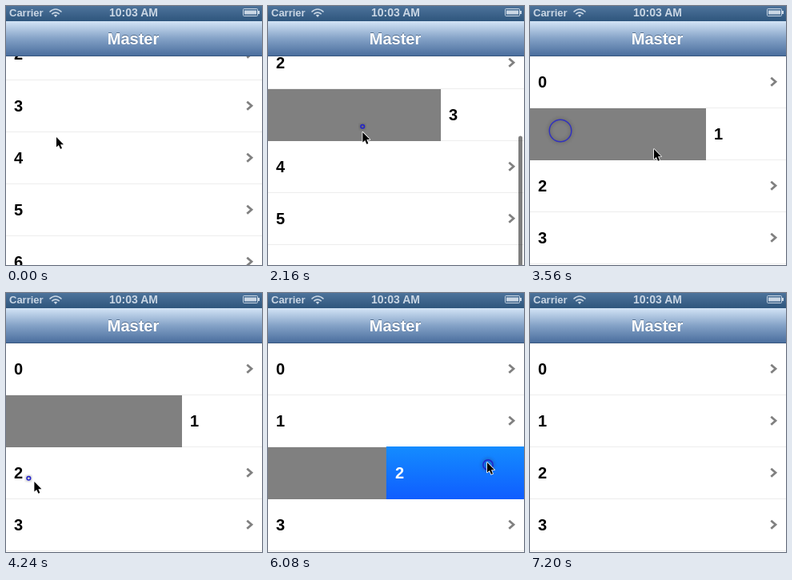
An HTML page for the animation above (7.56 s loop, 320 by 324 pixels).

```html
<!DOCTYPE html>
<html lang="en">
<head>
<meta charset="utf-8">
<title>Master list</title>
<style>
  html, body { margin: 0; width: 100%; height: 100%; overflow: hidden; background: #fff; }
  svg { display: block; width: 100%; height: 100%; }
  text { font: bold 20px "Liberation Sans", Arial, sans-serif; }
  .status { fill: #c9d6e4; }
</style>
</head>
<body>
<svg id="stage" viewBox="0 0 320 324">
  <defs>
    <linearGradient id="statusFill" x2="0" y2="1">
      <stop stop-color="#4d739b"/><stop offset="1" stop-color="#2d547b"/>
    </linearGradient>
    <linearGradient id="navFill" x2="0" y2="1">
      <stop stop-color="#d3e4f6"/><stop offset=".5" stop-color="#83a1c6"/>
      <stop offset="1" stop-color="#486c9c"/>
    </linearGradient>
    <linearGradient id="selectedFill" x2="0" y2="1">
      <stop stop-color="#148cff"/><stop offset="1" stop-color="#0f5dff"/>
    </linearGradient>
    <filter id="soft" x="-50%" y="-50%" width="200%" height="200%"><feGaussianBlur stdDeviation="2"/></filter>
  </defs>
  <rect width="320" height="324" fill="#fff"/>
  <g id="list"></g>
  <rect id="scrollBar" x="313" width="5" height="267" rx="2.5"/>
  <rect width="320" height="20" fill="url(#statusFill)"/>
  <rect y="19" width="320" height="44" fill="url(#navFill)"/>
  <rect y="62" width="320" height="1" fill="#38577f"/>
  <text class="status" x="4" y="13" style="font-size:13px">Carrier</text>
  <text class="status" x="159.5" y="13" text-anchor="middle" style="font-size:14px">10:03 AM</text>
  <g fill="none" stroke="#c9d6e4" stroke-width="1.6">
    <path d="M54.5 7.5Q62 .5 69.5 7.5M57.3 10.2Q62 6 66.7 10.2"/>
    <path d="M59.7 11.6Q62 9.8 64.3 11.6L62 14Z" fill="#c9d6e4" stroke="none"/>
    <rect x="296.5" y="3.5" width="18" height="9" rx="1" stroke-width="1"/>
    <path d="M298 8H313" stroke-width="5"/>
    <path d="M316 6V10" stroke-width="2"/>
  </g>
  <text x="159" y="47" text-anchor="middle" fill="#3f5878" opacity=".75">Master</text>
  <text x="159" y="48" text-anchor="middle" fill="#fff">Master</text>
  <g id="touch" fill="none">
    <circle id="glow" stroke="#333" stroke-width="4" opacity=".3" filter="url(#soft)"/>
    <circle id="ring" stroke="#2222cc" stroke-width="1.5"/>
  </g>
  <path id="cursor" d="M0 0V12.5L2.9 10L5 14.8L7 14L5 9.2H9Z" stroke="#fff" stroke-width="1.6" stroke-linejoin="round" paint-order="stroke"/>
</svg>
<script>
const LOOP = 7560, STEP = 40, ROW = 65, TOP = 63;
const OPEN = 220, SLIDE = 200, RECOGNISE = 80, RIPPLE = 520, LAG = 30;
const START_SCROLL = 165, GLIDE_TIME = 180;
const $ = id => document.getElementById(id);

const stop = (start, x, y) => ({ start, end: start, from: [x, y], to: [x, y] });

// A swipe is recognised after 18px, where its touch ends and ripples.
const swipe = (start, end, from, to) => ({
  start, end, from, to,
  release: start + RECOGNISE,
  origin: [from[0] + 18 * Math.sign(to[0] - from[0]), from[1]]
});

const openThree = swipe(810, 1200, [20, 123], [116, 131]);
const drag = { start: 2085, end: 2525, from: [118, 140], to: [120, 245], release: 2525, origin: [120, 245] };
const openOne = swipe(3250, 3560, [20, 156], [155, 179]);
const openTwo = swipe(4170, 4640, [19, 226], [129, 293]);
const closeTwo = swipe(5923, 6080, [293, 215], [274, 212]);
const gestures = [openThree, drag, openOne, openTwo, closeTwo];

// The cursor glides between gestures and waits off stage at times.
const moves = [
  stop(0, 63, 164), openThree, drag, openOne, openTwo,
  stop(4880, 136, 330), stop(5280, 340, 330), stop(5320, 340, 152), stop(5600, 303, 194),
  closeTwo, stop(6960, -14, 236)
];

const reveals = {
  3: { opens: openThree.release, closes: drag.start + 58 },
  1: { opens: openOne.release, closes: openTwo.release },
  2: { opens: openTwo.release, closes: closeTwo.release, selects: true }
};

const clamp = v => Math.max(0, Math.min(1, v));
const ease = v => (1 - Math.cos(Math.PI * clamp(v))) / 2;
const mix = (a, b, p) => a.map((v, i) => v + (b[i] - v) * p);
const along = (g, t) => mix(g.from, g.to, clamp((t - g.start) / (g.end - g.start)));

function set(node, attrs) {
  for (const key in attrs) node.setAttribute(key, attrs[key]);
}

const place = (node, [x, y]) => set(node, { transform: `translate(${x} ${y})` });

function cursorAt(t) {
  const i = moves.findLastIndex(m => m.start <= t);
  const current = moves[i], next = moves[i + 1];
  if (t < current.end) return along(current, t);
  if (!next) return current.to;
  return mix(current.to, next.from, ease((t - current.end) / (next.start - current.end)));
}

function scrollAt(t) {
  const dragged = along(drag, t - LAG)[1] - drag.from[1];
  const coast = Math.max(0, t - LAG - drag.end);
  return Math.round((START_SCROLL - dragged) * Math.exp(-coast / GLIDE_TIME));
}

$("list").innerHTML = Array.from({ length: 10 }, (_, i) => `
  <g>
    <rect width="320" height="${ROW}" fill="#808080"/>
    <g>
      <rect width="320" height="${ROW}" fill="#fff"/>
      <path d="M0 64.5H320" stroke="#ededed"/>
      <rect x="-1" y="-1" width="321" height="${ROW + 1}" fill="url(#selectedFill)"/>
      <text x="10" y="39">${i}</text>
      <path d="M301.3 26.8L307 31.8L301.3 36.8" fill="none" stroke="#808080" stroke-width="2.8"/>
    </g>
  </g>`).join("");
const rows = [...$("list").children].map(node => {
  const cell = node.children[1];
  const [, , highlight, label, chevron] = cell.children;
  return { node, cell, highlight, label, chevron };
});

function drawRows(t, scroll) {
  rows.forEach((row, i) => {
    const { opens, closes, selects } = reveals[i] || { opens: LOOP, closes: LOOP };
    const shift = OPEN * (ease((t - opens) / SLIDE) - ease((t - closes) / SLIDE));
    const selected = selects && t >= closes - RECOGNISE && t < closes + SLIDE;
    place(row.node, [0, TOP + i * ROW - scroll]);
    place(row.cell, [shift, 0]);
    set(row.highlight, { visibility: selected ? "visible" : "hidden" });
    set(row.label, { fill: selected ? "#fff" : "#000" });
    set(row.chevron, { stroke: selected ? "#fff" : "#808080" });
  });
}

function drawTouch(t) {
  const touch = gestures.find(g => t >= g.start && t < g.release + RIPPLE);
  set($("touch"), { visibility: touch ? "visible" : "hidden" });
  if (!touch) return;
  const age = Math.max(0, t - touch.release);
  const r = 2.3 + age * .05;
  place($("touch"), age ? touch.origin : along(touch, t - LAG));
  set($("touch"), { opacity: 1 - .85 * (age / RIPPLE) ** 2 });
  set($("ring"), { r });
  set($("glow"), { r });
}

function draw(t) {
  const scroll = scrollAt(t);
  drawRows(t, scroll);
  set($("scrollBar"), {
    y: TOP + 1 + scroll * .64,
    opacity: .5 * clamp((t - drag.start) / 40) * clamp((3240 - t) / 240)
  });
  drawTouch(t);
  place($("cursor"), cursorAt(t));
}

const start = performance.now();
function tick() {
  const t = (performance.now() - start) % LOOP;
  draw(Math.floor(t / STEP) * STEP);
  requestAnimationFrame(tick);
}
tick();
</script>
</body>
</html>
```
